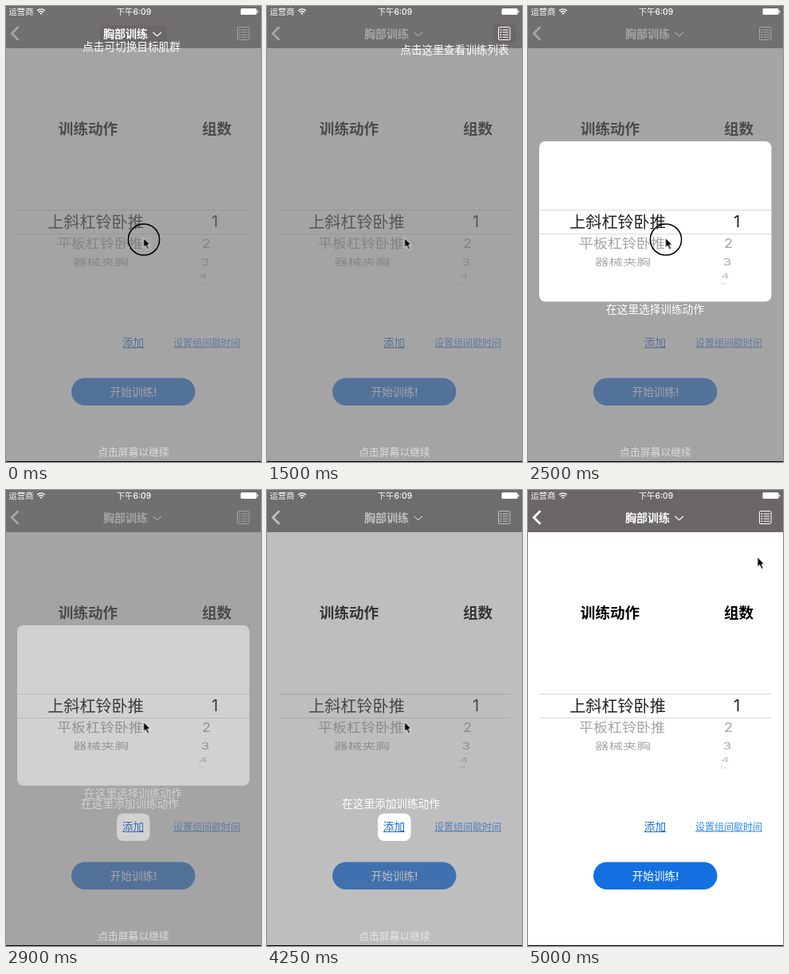
Recreate the animation shown at these times as an HTML page. Size 320 px wide and 573 px high, loop 5050 ms.

```html
<!DOCTYPE html>
<html lang="zh-CN">
<head>
<meta charset="utf-8">
<title>训练引导</title>
<style>
  html, body { margin: 0; width: 100%; height: 100%; overflow: hidden; background: #fff; }
  svg { display: block; width: 320px; height: 573px; }
  text { font-family: Inter, "Noto Sans CJK SC", "Noto Sans CJK", sans-serif; text-anchor: middle; }
  .bold { font-weight: 700; }
  .medium { font-weight: 500; }
  .status { font-size: 10.3px; fill: #fff; }
  .head { font-size: 18.6px; font-weight: 700; fill: #000; }
  .line { fill: none; stroke: #fff; }
  .hint { font-size: 13.65px; font-weight: 500; fill: #fff; }

  .tour, .s1, .s2, .s3, .s4, .tap, .cursor {
    animation: 5050ms step-end infinite;
  }
  .tour { animation-name: tour; }
  .s1 { animation-name: s1; }
  .s2 { animation-name: s2; }
  .s3 { animation-name: s3; }
  .s4 { animation-name: s4; }
  .tap { animation-name: tap; }
  .cursor { animation-name: move; }

  @keyframes tour {
    0% { opacity: 1; } 83.16% { opacity: .9; } 84.15% { opacity: .71; }
    85.14% { opacity: .35; } 86.13%, 100% { opacity: 0; }
  }
  @keyframes s1 {
    0% { opacity: 1; } 4.95% { opacity: .8; } 5.94% { opacity: .5; }
    6.93% { opacity: .2; } 7.92%, 100% { opacity: 0; }
  }
  @keyframes s2 {
    0% { opacity: 0; } 4.95% { opacity: .2; } 5.94% { opacity: .5; }
    6.93% { opacity: .8; } 7.92% { opacity: 1; }
    31.68% { opacity: .75; } 32.67% { opacity: .45; } 33.66%, 100% { opacity: 0; }
  }
  @keyframes s3 {
    0% { opacity: 0; } 31.68% { opacity: .25; } 32.67% { opacity: .55; } 33.66% { opacity: 1; }
    56.43% { opacity: .8; } 57.42% { opacity: .5; } 58.41% { opacity: .2; } 59.4%, 100% { opacity: 0; }
  }
  @keyframes s4 {
    0% { opacity: 0; } 56.43% { opacity: .2; } 57.42% { opacity: .5; }
    58.41% { opacity: .8; } 59.4%, 100% { opacity: 1; }
  }
  @keyframes tap {
    0% { opacity: 1; } 3.96% { opacity: 0; }
    23.76% { opacity: 1; } 29.7% { opacity: 0; }
    49.5% { opacity: 1; } 54.45% { opacity: 0; }
    76.23% { opacity: 1; } 81.18%, 100% { opacity: 0; }
  }
  @keyframes move {
    0% { transform: translate(172.5px, 291.5px); }
    98.01% { transform: translate(230px, 188px); }
    99%, 100% { transform: translate(288px, 84.5px); }
  }
</style>
</head>
<body>
<svg viewBox="0 0 320 573">
  <defs>
    <mask id="holes" maskUnits="userSpaceOnUse" x="0" y="0" width="320" height="573">
      <rect width="320" height="573" fill="#fff"/>
      <rect class="s1" x="118" y="24" width="84" height="22.5" rx="6"/>
      <rect class="s2" x="283" y="23" width="30" height="23" rx="6"/>
      <rect class="s3" x="14" y="170" width="291.5" height="201.5" rx="8"/>
      <rect class="s4" x="139" y="406.5" width="41.5" height="34.5" rx="8"/>
    </mask>
  </defs>

  <rect width="320" height="573" fill="#fff"/>

  <!-- navigation bar -->
  <rect width="320" height="53" fill="#6b6769"/>
  <path class="line" d="M15.5 26.3 7.3 34.5 15.5 42.7" stroke-width="2.8"/>
  <text class="bold" x="150" y="40.2" font-size="14" fill="#fff">胸部训练</text>
  <path class="line" d="M184.5 33 189.7 37.7 195 33" stroke-width="1.1"/>
  <g class="line">
    <rect x="290.5" y="26.5" width="14.5" height="16" rx="1.5"/>
    <path d="M292.5 30h1.7M292.5 33h1.7M292.5 36.2h1.7M292.5 39.3h1.7" stroke-width="1.6"/>
    <path d="M295.7 30h7.3M295.7 33h7.3M295.7 36.2h7.3M295.7 39.3h7.3"/>
  </g>

  <text class="head" x="103" y="160.5">训练动作</text>
  <text class="head" x="264.5" y="160.5">组数</text>

  <!-- picker wheels -->
  <path d="M14 256.5H305.5M14 286.5H305.5" stroke="#d9d9d9"/>
  <g font-size="20.1" fill="#222">
    <text x="112.5" y="278.5">上斜杠铃卧推</text>
    <text x="262" y="278.3">1</text>
  </g>
  <g transform="translate(0 298) scale(1 .9)" font-size="18" fill="#a3a3a3">
    <text x="118" y="6.7">平板杠铃卧推</text>
    <text x="251.5" y="6.6">2</text>
  </g>
  <g transform="translate(0 322) scale(1 .68)" font-size="17.5" fill="#a8a8a8">
    <text x="119" y="6.5">器械夹胸</text>
    <text x="250" y="6.4">3</text>
  </g>
  <text transform="translate(247.5 339.5) scale(1 .48)" y="5.8" font-size="16" fill="#b8b8b8">4</text>
  <text transform="translate(245.3 348.5) scale(1 .2)" y="5.5" font-size="15" fill="#d2d2d2">5</text>

  <!-- actions -->
  <g fill="#1a6fd0">
    <text x="159.5" y="428.3" font-size="13.65">添加</text>
    <rect x="146" y="429" width="27" height="1"/>
  </g>
  <g fill="#2d8af0">
    <text x="252" y="428" font-size="12">设置组间歇时间</text>
    <rect x="210" y="428.5" width="84" height="1"/>
  </g>
  <rect x="82" y="467.5" width="155.5" height="34.5" rx="17.25" fill="#1470e0"/>
  <text class="medium" x="160" y="490" font-size="13.65" fill="#fff">开始训练!</text>

  <!-- guided tour -->
  <g class="tour">
    <rect width="320" height="573" fill="#767476" fill-opacity=".65" mask="url(#holes)"/>
    <text class="hint s1" x="157.5" y="56.2">点击可切换目标肌群</text>
    <text class="hint s2" x="235.5" y="60.2">点击这里查看训练列表</text>
    <text class="hint s3" x="159.5" y="386">在这里选择训练动作</text>
    <text class="hint s4" x="155.5" y="399.2">在这里添加训练动作</text>
    <text x="160" y="564.5" font-size="12.8" fill="#dcdcdc">点击屏幕以继续</text>
  </g>

  <!-- status bar -->
  <text class="status" x="19" y="10.9">运营商</text>
  <g class="line" stroke-width="1.4">
    <path d="M39.2 5.9a6.8 6.8 0 0 1 9.6 0M41 7.9a4.3 4.3 0 0 1 6 0"/>
    <path d="M42.5 9.2a2.2 2.2 0 0 1 3 0L44 10.9z" fill="#fff" stroke="none"/>
  </g>
  <text class="status medium" x="160.5" y="10.9" font-size="10.6">下午6:09</text>
  <rect x="294.5" y="3" width="20" height="8" rx="1.5" fill="#fff"/>
  <rect x="315" y="5.5" width="1.3" height="3" rx=".6" fill="#fff"/>
  <rect y="572" width="320" height="1"/>

  <circle class="tap" cx="173" cy="293.5" r="19.6" fill="none" stroke="#000" stroke-width="1.5"/>
  <path class="cursor" d="M0 0V12.2L2.8 9.6 5 14.6 7.2 13.6 5 8.8H8.8Z" stroke="#fff" stroke-width=".9"/>
</svg>
</body>
</html>
```
